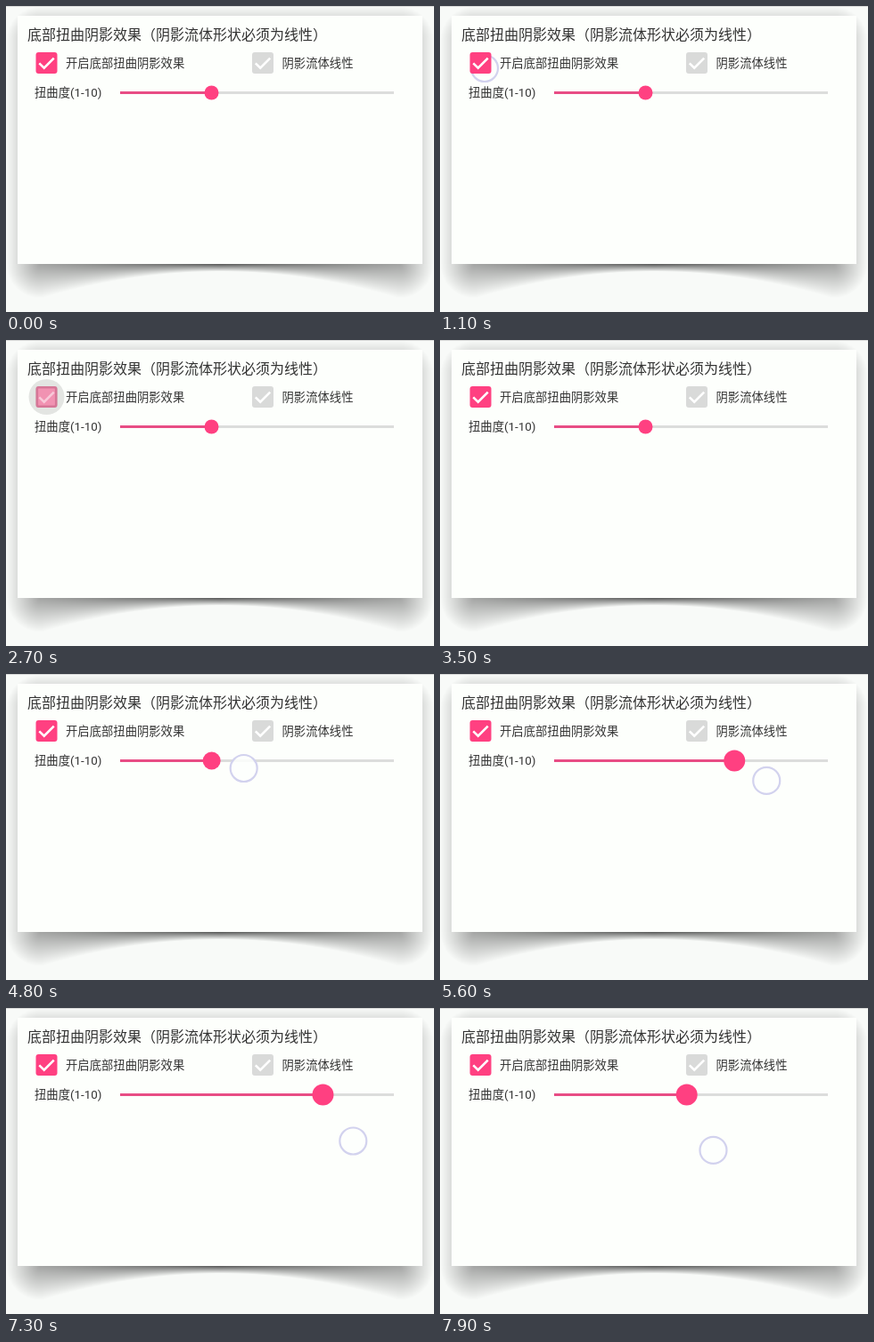
Animation, 480 px wide and 344 px high, one loop 8 s. Source, as an HTML page with a canvas:

```html
<!DOCTYPE html>
<html lang="zh">
<head>
<meta charset="utf-8">
<style>
html, body { margin: 0; width: 100%; height: 100%; overflow: hidden; background: #f8faf8; }
canvas { display: block; width: 480px; height: 344px; }
</style>
</head>
<body>
<canvas id="stage" width="480" height="344"></canvas>
<script>
const W = 480, H = 344, LOOP = 8000;
const PINK = '#ff4081', GREY = '#d9dad9', DARK = '#757575';
const FONT = 'Roboto, "Noto Sans CJK SC", "Noto Sans CJK", sans-serif';
const DRAG_START = 4400;
const ctx = document.getElementById('stage').getContext('2d');

const clamp = (v, lo = 0, hi = 1) => Math.min(hi, Math.max(lo, v));
const progress = (t, start, duration) => clamp((t - start) / duration);
const ease = p => (1 - Math.cos(Math.PI * p)) / 2;

// Shade falls off with distance from an inner box; a bent base rises to the middle.
function makeShadow(bend) {
  const image = ctx.createImageData(W, H);
  const inset = 38, base = 290;
  for (let y = 0; y < H; y++) {
    for (let x = 0; x < W; x++) {
      const u = clamp((x - 239.5) / 200, -1, 1);
      const reach = inset - bend * (1 - u * u);
      const dx = Math.max(inset - x, 0, x - (W - 1 - inset));
      const dy = y >= base ? (y - base) * inset / reach : Math.max(inset - y, 0);
      const fade = clamp(1 - Math.hypot(dx, dy) / inset);
      const bentStrength = y >= base ? 0.62 - 0.28 * Math.abs(u) : 0.36;
      const light = 1 - (bend ? bentStrength : 0.65) * fade;
      image.data.set([248 * light, 250 * light, 248 * light, 255], (y * W + x) * 4);
    }
  }
  return image;
}
const straight = makeShadow(0), bent = makeShadow(30);

function circle(x, y, r, fill) {
  ctx.beginPath();
  ctx.arc(x, y, r, 0, Math.PI * 2);
  ctx.fillStyle = fill;
  ctx.fill();
}

function text(str, x, y, size) {
  ctx.font = `${size}px ${FONT}`;
  ctx.fillStyle = '#333';
  ctx.fillText(str, x, y);
}

function checkbox(x, y, amount, color) {
  ctx.globalAlpha = 1 - amount;
  ctx.strokeStyle = DARK;
  ctx.lineWidth = 2.6;
  ctx.beginPath();
  ctx.roundRect(x + 1.3, y + 1.3, 21.4, 21.4, 2);
  ctx.stroke();
  ctx.globalAlpha = amount;
  ctx.fillStyle = color;
  ctx.beginPath();
  ctx.roundRect(x, y, 24, 24, 3);
  ctx.fill();
  ctx.strokeStyle = '#fff';
  ctx.beginPath();
  ctx.moveTo(x + 3.8, y + 12.4);
  ctx.lineTo(x + 9.2, y + 17.6);
  ctx.lineTo(x + 20.2, y + 6.6);
  ctx.stroke();
  ctx.globalAlpha = 1;
}

function touch(x, y) {
  circle(x, y, 15, 'rgba(253,255,253,0.85)');
  ctx.strokeStyle = '#d2d2ee';
  ctx.lineWidth = 2.2;
  ctx.stroke();
}

function tap(t, start, end, rippleEnd) {
  if (t < start || t >= rippleEnd) return;
  const fade = 1 - progress(t, end, rippleEnd - end);
  circle(45.5, 64, 20 * progress(t, start - 100, 300), `rgba(0,0,0,${0.1 * fade})`);
  if (t < end) touch(50, 70);
}

function slider(t) {
  const dragging = t >= DRAG_START;
  const out = ease(progress(t, 4500, 1900));
  const back = ease(progress(t, 6650, 2000));
  const thumbX = dragging ? 220 + 177 * out - 174 * back : 230.5;

  ctx.fillStyle = '#dcdddc';
  ctx.fillRect(128, 96, 307, 3);
  ctx.fillStyle = '#e84d85';
  ctx.fillRect(128, 96, thumbX - 128, 3);
  circle(thumbX, 97.5, 8 + 4 * progress(t, DRAG_START, 800), PINK);
  if (dragging) touch(256 + 177 * out - 183 * back, 106 + (t - 4800) * 0.0174);
}

function draw(t) {
  const curved = t < 1300 || t >= 2700;
  const checked = 1 - progress(t, 1200, 200) + progress(t, 2600, 200);

  ctx.putImageData(curved ? bent : straight, 0, 0);
  ctx.fillStyle = '#d9dad9';
  ctx.fillRect(0, 0, W, 1);
  ctx.fillStyle = '#fdfffc';
  ctx.fillRect(13, 11, 454, 279);

  text('底部扭曲阴影效果（阴影流体形状必须为线性）', 24, 38, 16);
  text('开启底部扭曲阴影效果', 67, 69, 13.33);
  text('阴影流体线性', 309.5, 69, 13.33);
  text('扭曲度(1-10)', 32, 102, 13.33);

  tap(t, 1100, 1300, 1700);
  tap(t, 2400, 2700, 3200);
  checkbox(33.5, 52, checked, PINK);
  checkbox(276, 52, 1, curved ? GREY : PINK);
  slider(t);
}

function tick() {
  const t = performance.now() % LOOP;
  draw(Math.floor(t / 100) * 100);
  requestAnimationFrame(tick);
}
tick();
</script>
</body>
</html>
```
